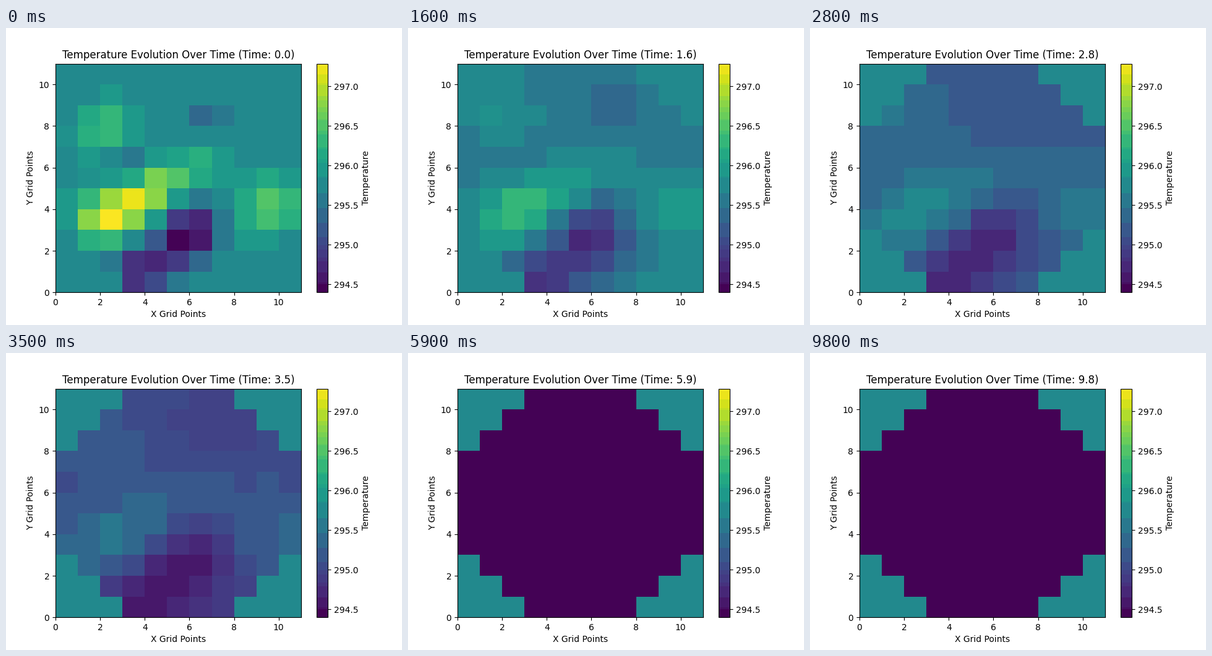
Animation of 640 by 480 pixels, one loop 9900 ms. Source, as a matplotlib script:

```python
import matplotlib
import matplotlib.pyplot as plt
import numpy as np
from matplotlib.animation import FuncAnimation
from matplotlib.colors import ListedColormap

FRAMES, STEP = 99, 0.1
BASE = 295.78
VMIN, VMAX = 294.40, 297.285
DIFFUSION, DAMPING = 0.18, 0.12

# Warm and cold spots: x, y, strength in degrees, squared spread.
SPOTS = [
    (1.65, 3.1, 1.40, 1.4),
    (3.1, 3.8, 1.20, 1.1),
    (4.4, 4.8, 0.95, 1.1),
    (6.2, 5.8, 0.45, 1.1),
    (9.1, 3.65, 0.76, 2.2),
    (1.75, 7.45, 0.72, 1.5),
    (2.7, 5.8, -0.38, 1.1),
    (6.3, 7.95, -0.38, 1.1),
    (5.55, 2.4, -1.50, 1.5),
    (3.3, 0.5, -1.25, 1.2),
    (4.8, 1.2, -0.52, 1.1),
]

yy, xx = np.mgrid[0:11, 0:11]
disc = (xx - 5)**2 + (yy - 5)**2 <= 30


def banded_viridis():
    """Viridis with neighbouring shades merged into flat bands."""
    rgb = (matplotlib.colormaps["viridis"](np.arange(256))[:, :3] * 255).astype(int)
    weight = np.ones(256)
    weight[int((BASE - VMIN) / (VMAX - VMIN) * 256)] = 60
    weight[0] = 30
    keys = rgb // [32, 16, 32]
    bands = np.empty((256, 3))
    for key in np.unique(keys, axis=0):
        same = (keys == key).all(axis=1)
        bands[same] = np.average(rgb[same], axis=0, weights=weight[same])
    return ListedColormap(bands / 255)


def laplacian(field):
    """Five-point Laplacian with no flux across the rim of the disc."""
    total = np.zeros_like(field)
    values, inside = np.pad(field, 1), np.pad(disc, 1)
    for dy, dx in ((0, 1), (2, 1), (1, 0), (1, 2)):
        window = np.s_[dy:dy + 11, dx:dx + 11]
        total += np.where(inside[window], values[window] - field, 0)
    return total


def simulate():
    """Spots spread and fade while the whole disc cools ever faster."""
    offset = sum(power * np.exp(-((xx - x)**2 + (yy - y)**2) / spread)
                 for x, y, power, spread in SPOTS)
    fields = []
    for i in range(FRAMES):
        cooling = 0.132 * (i * STEP) ** 1.4
        fields.append(BASE + disc * (offset - cooling))
        offset = offset + STEP * (DIFFUSION * laplacian(offset) - DAMPING * offset)
    return fields


fields = simulate()

fig, ax = plt.subplots(figsize=(6.4, 4.8), dpi=100)
mesh = ax.pcolormesh(np.arange(12), np.arange(12), fields[0],
                     cmap=banded_viridis(), vmin=VMIN, vmax=VMAX)
fig.colorbar(mesh, ax=ax, label="Temperature")
ax.set_xlabel("X Grid Points")
ax.set_ylabel("Y Grid Points")
title = ax.set_title("")


def update(i):
    mesh.set_array(fields[i])
    title.set_text(f"Temperature Evolution Over Time (Time: {i * STEP:.1f})")
    return mesh, title


anim = FuncAnimation(fig, update, frames=FRAMES, interval=100, repeat=True)
plt.show()
```
